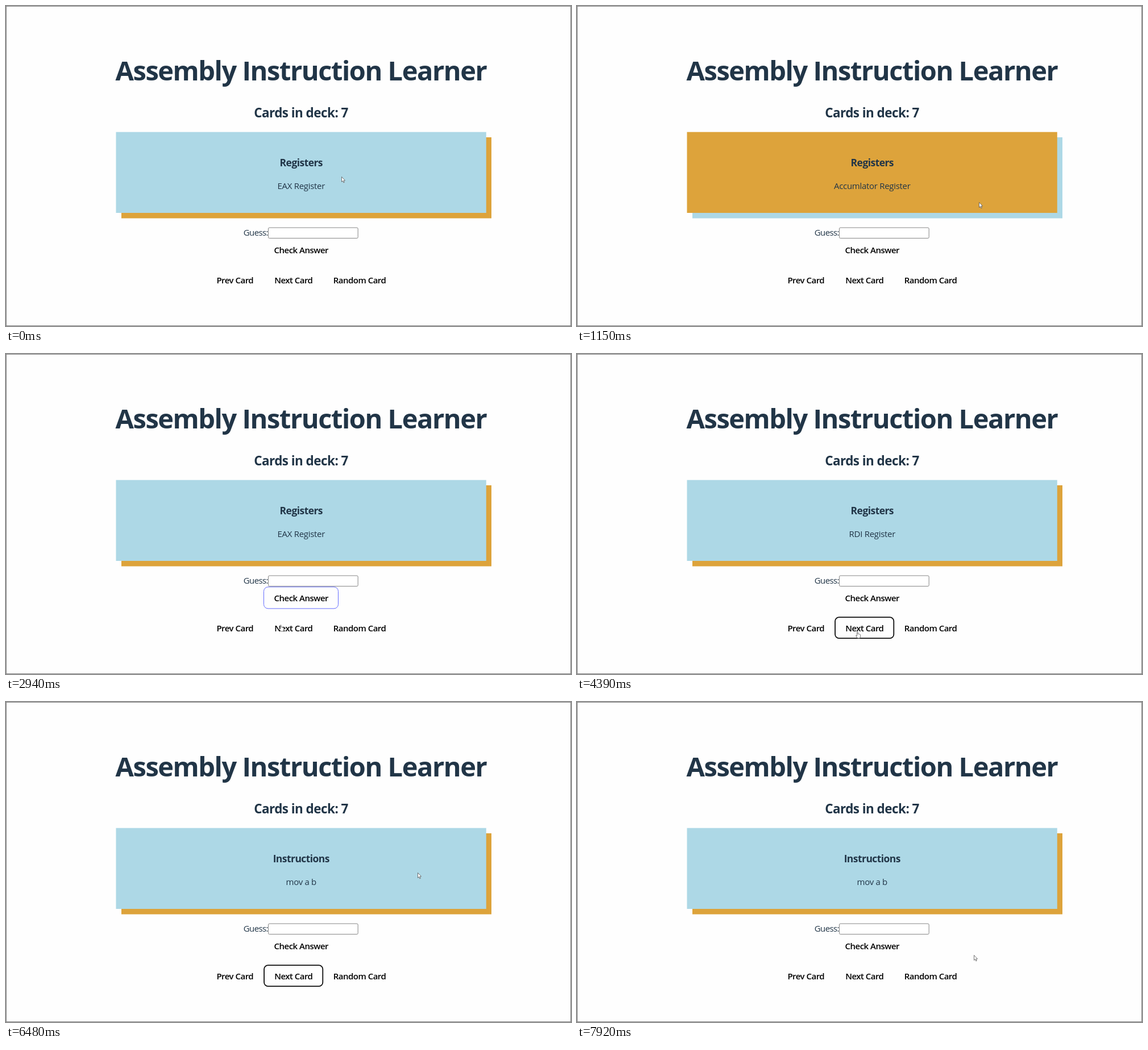
An HTML page that plays this animation: 994x563 px, repeating every 8 s.

```html
<!DOCTYPE html>
<html lang="en">
<head>
<meta charset="utf-8">
<title>Flash cards</title>
<style>
  html, body { margin: 0; width: 100%; height: 100%; overflow: hidden; background: #fefefe; }
  svg { display: block; width: 994px; height: 563px; }
  text { font: 15px "Open Sans", "Noto Sans", sans-serif; letter-spacing: -.02em; fill: #213547; text-anchor: middle; }
  .title { font-size: 47px; font-weight: 700; letter-spacing: -.031em; }
  .deck { font-size: 22.5px; font-weight: 700; letter-spacing: -.025em; }
  .topic { font-size: 17.5px; font-weight: 700; letter-spacing: -.032em; }
  .label { text-anchor: end; letter-spacing: -.04em; }
  .button { font-weight: 600; letter-spacing: -.034em; fill: #000; }
  .hover { fill: none; stroke: #646cff; }
  .pointer path { fill: #fff; stroke: #555; stroke-width: .8; stroke-linejoin: round; }
</style>
</head>
<body>
<svg viewBox="0 0 994 563">
  <rect x=".5" y=".5" width="993" height="562" fill="#fefefe" stroke="#808080"/>
  <text class="title" x="519" y="131">Assembly Instruction Learner</text>
  <text class="deck" x="519" y="196">Cards in deck: 7</text>

  <rect id="shadow" x="203" y="231" width="651" height="142.5"/>
  <rect id="card" x="193.5" y="221.7" width="651.3" height="142.3"/>
  <text id="topic" class="topic" x="519.3" y="281.5"></text>
  <text id="body" x="519.3" y="321.8"></text>

  <text class="label" x="461" y="403.8">Guess:</text>
  <rect x="461.5" y="390" width="157.7" height="18.6" rx="2" fill="#fff" stroke="#858585"/>

  <rect id="checkHover" class="hover" x="453.5" y="409.9" width="131" height="38" rx="7.5"/>
  <rect id="nextHover" class="hover" x="453.5" y="462.9" width="104" height="38" rx="7.5"/>
  <rect id="focus" x="454.1" y="463.1" width="103.2" height="37.1" rx="7" fill="none" stroke="#101010" stroke-width="1.8"/>
  <text class="button" x="519.3" y="434.8">Check Answer</text>
  <text class="button" x="402.8" y="487.8">Prev Card</text>
  <text class="button" x="505.8" y="487.8">Next Card</text>
  <text class="button" x="622" y="487.8">Random Card</text>

  <g id="pointer" class="pointer">
    <path id="arrow" d="M.5 .5V9.4L2.5 7.6 3.9 10.8 5.3 10.2 3.9 7H6.6Z"/>
    <path id="hand" d="M2.6 7V1.3Q3.4 0 4.2 1.3V4.6Q5.2 4 5.8 4.9 6.7 4.4 7.3 5.3 8.6 5 8.6 6.4V9L7.6 12H3.5L.6 8Q.4 6.4 2.6 7.8Z"/>
  </g>
</svg>
<script>
const LOOP = 8000, BLUE = '#add8e6', ORANGE = '#dda33b';
const el = id => document.getElementById(id);

// Each track holds its value until the next start time.
const cards = [
  [0, 'Registers', 'EAX Register'],
  [650, 'Registers', 'Accumlator Register', true],
  [1680, 'Registers', 'EAX Register'],
  [4390, 'Registers', 'RDI Register'],
  [4940, 'Registers', 'RCX Register'],
  [5460, 'Instructions', 'mov a b'],
  [7010, 'Instructions', 'Copy value at b into a', true],
  [7640, 'Instructions', 'mov a b'],
];
const moves = [
  [0, 590, 300], [120, 665, 332], [240, 707, 347], [1150, 707, 345],
  [2050, 690, 358], [2180, 630, 388], [2300, 570, 418], [2430, 544, 427, true],
  [2820, 520, 446, true], [2940, 480, 476, true], [3080, 477, 483, true],
  [3200, 477, 487, true], [3480, 490, 488, true], [6080, 504, 488, true],
  [6220, 620, 425], [6350, 763, 320], [6480, 724, 300],
  [7770, 722, 320], [7920, 698, 445],
];
const checkHover = [[0, 0], [2430, .5], [2570, 1], [3080, .5], [3200, 0]];
const nextHover = [[0, 0], [3080, .5], [3200, 1], [3740, 0]];
const focus = [[0, 0], [3740, 1], [7010, 0]];

const at = (track, t) => track.findLast(([start]) => start <= t).slice(1);
const fade = (id, opacity) => el(id).setAttribute('opacity', opacity);

function draw(t) {
  const [topic, body, flipped] = at(cards, t);
  el('topic').textContent = topic;
  el('body').textContent = body;
  el('card').setAttribute('fill', flipped ? ORANGE : BLUE);
  el('shadow').setAttribute('fill', flipped ? BLUE : ORANGE);

  const [x, y, isHand] = at(moves, t);
  el('pointer').setAttribute('transform', `translate(${x} ${y})`);
  fade('hand', isHand ? 1 : 0);
  fade('arrow', isHand ? 0 : 1);

  fade('checkHover', at(checkHover, t)[0]);
  fade('nextHover', at(nextHover, t)[0]);
  fade('focus', at(focus, t)[0]);
}

const begin = performance.now();
function tick() {
  draw((performance.now() - begin) % LOOP);
  requestAnimationFrame(tick);
}
tick();
</script>
</body>
</html>
```
